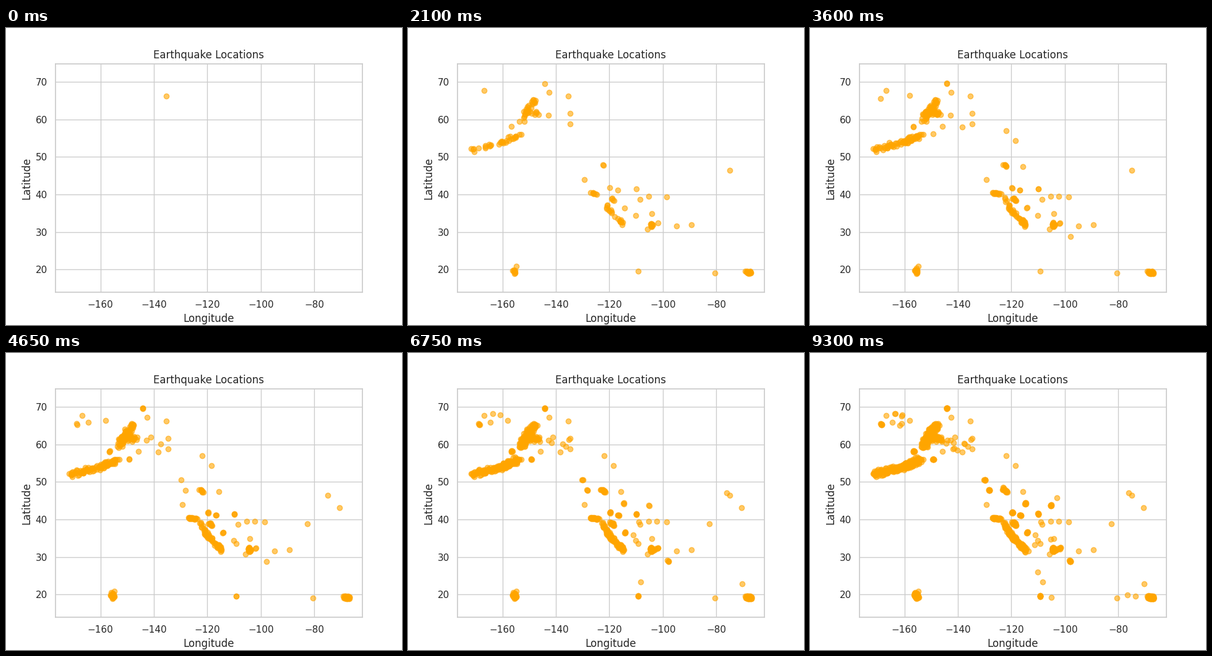
A matplotlib script that plays this animation: 640 px wide and 480 px high, repeating every 9450 ms.

```python
import matplotlib.pyplot as plt
import numpy as np
from matplotlib.animation import FuncAnimation

FRAMES = 63
LAST = FRAMES - 1
INTERVAL = 150
INK, LINE = "0.15", "0.8"

plt.rcParams.update({
    "font.family": "DejaVu Sans", "font.size": 12, "axes.titlesize": 12,
    "text.color": INK, "axes.labelcolor": INK,
    "xtick.color": INK, "ytick.color": INK,
    "xtick.labelsize": 11, "ytick.labelsize": 11,
    "axes.edgecolor": LINE, "axes.linewidth": 1.25,
    "grid.color": LINE, "grid.linewidth": 1, "axes.axisbelow": True,
})

rng = np.random.default_rng(7)

# Lone quakes at key places, in order of arrival
SITES = [
    (-135.3, 66.2), (-142.6, 67.2), (-134.6, 58.8), (-129.4, 44.0),
    (-108.5, 38.7), (-104.1, 34.9), (-94.8, 31.6), (-74.9, 46.4),
    (-80.5, 19.0), (-154.8, 20.9), (-89.4, 31.9), (-98.5, 39.3),
    (-110.1, 34.4), (-105.7, 30.8), (-122.0, 57.0), (-118.5, 54.4),
    (-115.7, 47.4), (-82.6, 38.8), (-70.5, 43.1), (-70.3, 22.8),
    (-76.1, 47.1), (-108.3, 23.4), (-105.1, 19.2), (-76.5, 19.9),
    (-110.1, 26.0), (-73.5, 19.6),
]

# Centres of repeated shocks, in order of onset
SWARMS = [
    (-156.5, 58.2), (-144.1, 69.6), (-116.6, 41.2), (-114.1, 36.6),
    (-119.6, 41.9), (-109.9, 41.5), (-109.2, 19.6), (-149.2, 56.1),
    (-168.7, 65.4), (-98.0, 28.9), (-130.0, 50.6), (-128.3, 47.8),
    (-114.8, 44.3), (-105.2, 43.8),
]


def arrivals(count, start):
    """Steps at which events appear, quickening towards the end."""
    q = np.linspace(0, 1, count)
    return np.ceil(start + (LAST - start) * q**0.75)


def belt(path, spread, count, start=1):
    """Events scattered around a line through a few key points."""
    lon, lat = np.transpose(path)
    s = rng.uniform(0, len(path) - 1, count)
    dx, dy = np.clip(rng.normal(size=(2, count)), -1.8, 1.8) * spread
    knots = np.arange(len(path))
    return np.column_stack([arrivals(count, start),
                            np.interp(s, knots, lon) + 1.4 * dx,
                            np.interp(s, knots, lat) + dy])


def region(lon, lat, count, start):
    """Sparse events anywhere in a box."""
    return np.column_stack([arrivals(count, start),
                            rng.uniform(*lon, count),
                            rng.uniform(*lat, count)])


def make_events():
    steps = np.ceil(LAST * np.linspace(0, 1, len(SITES))**2.45)
    parts = [
        np.column_stack([steps, SITES]),
        # Aleutians and central Alaska
        belt([(-171.6, 52.1), (-160, 54.1), (-154, 56)], 0.45, 260),
        belt([(-152.6, 59.6), (-151, 62.3), (-148, 65.2)], 0.45, 200),
        belt([(-151.5, 62.5), (-149.5, 61.5), (-146.4, 61.6)], 0.4, 70),
        # West coast
        belt([(-123, 48.3), (-121.5, 47.2)], 0.2, 24, 5),
        belt([(-127.2, 40.4), (-124, 40.2)], 0.1, 50),
        belt([(-123, 39), (-119.2, 35), (-114.2, 31.6)], 0.28, 150),
        belt([(-119.4, 39.3), (-118.4, 38.4)], 0.2, 28),
        # Texas, Hawaii and the Caribbean
        belt([(-104.4, 32.4), (-104.3, 31.6)], 0.12, 100),
        belt([(-104, 31.6), (-100.8, 32.8)], 0.15, 14, 4),
        belt([(-155.9, 20.1), (-155.2, 19.2)], 0.26, 80, 3),
        belt([(-68.7, 19.3), (-66.9, 19.1)], 0.2, 150),
        # Scattered quakes
        region((-170, -157), (65, 68.5), 9, 7),
        region((-146, -134), (58, 62), 15, 2),
        region((-113, -100), (32, 46), 8, 8),
    ]
    parts += [belt([centre, centre], 0.1, 8, 1 + i**1.4)
              for i, centre in enumerate(SWARMS)]
    events = np.vstack(parts)
    events[:, 1:] = np.clip(events[:, 1:], (-171.9, 18.95), (-66.9, 69.9))
    return events[np.argsort(events[:, 0], kind="stable")]


events = make_events()

fig, ax = plt.subplots(figsize=(6.4, 4.8), dpi=100)
ax.set(xlim=(-176.85, -61.95), ylim=(13.9, 74.9),
       xlabel="Longitude", ylabel="Latitude", title="Earthquake Locations")
ax.set_xticks(range(-160, -79, 20))
ax.set_yticks(range(20, 71, 10))
ax.tick_params(left=False, bottom=False, length=6, pad=3.5)
ax.grid(True)
dots = ax.scatter([], [], color="orange", alpha=0.6)


def update(frame):
    dots.set_offsets(events[events[:, 0] <= frame, 1:])
    return dots,


anim = FuncAnimation(fig, update, frames=FRAMES, interval=INTERVAL,
                     repeat=True, repeat_delay=0)
plt.show()
```
